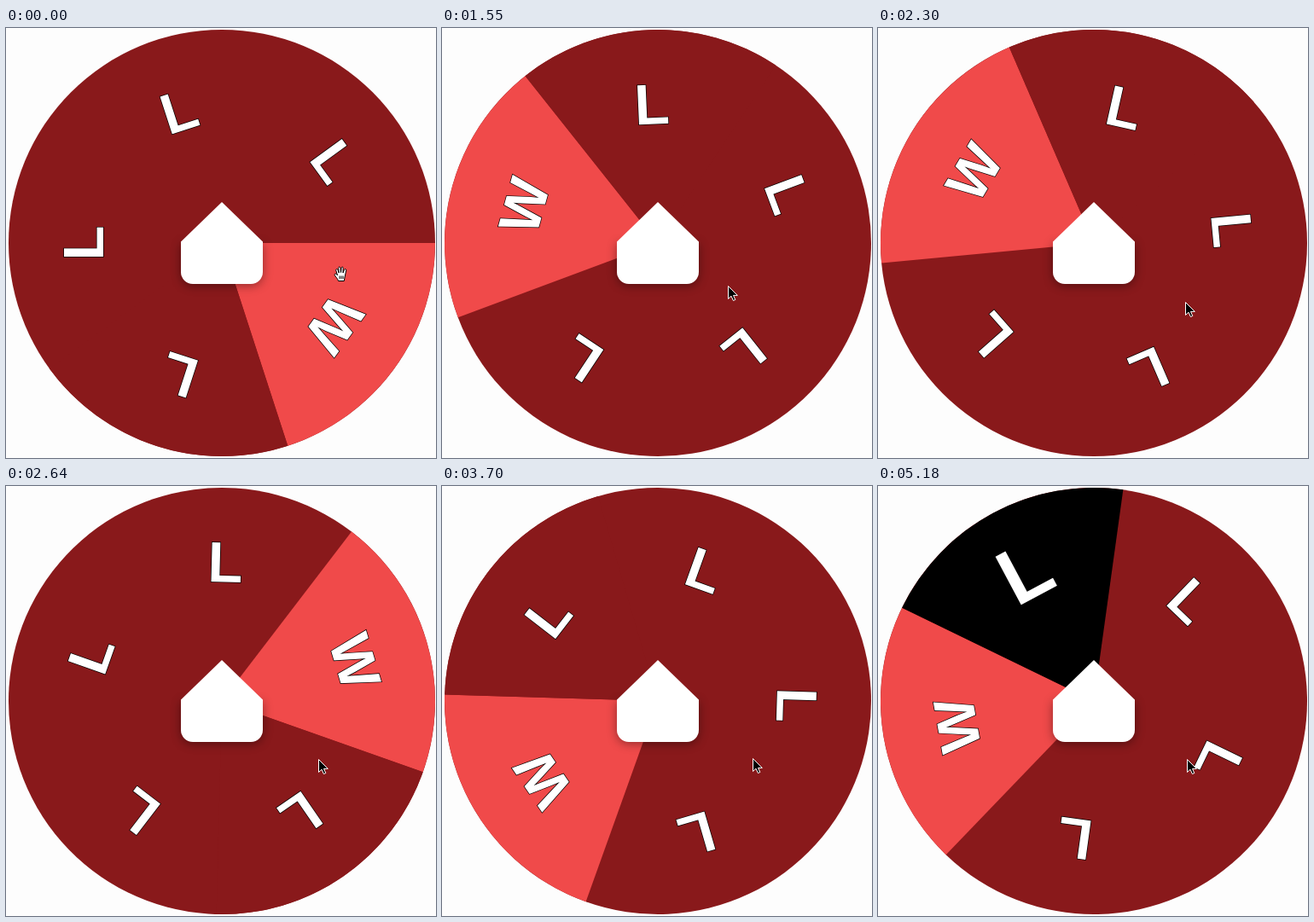
Animation, 504 px wide and 504 px high, one loop 5360 ms. Source, as an HTML page:

```html
<!DOCTYPE html>
<html lang="en">
<head>
<meta charset="utf-8">
<title>Prize wheel</title>
<style>
  html, body { margin: 0; width: 100%; height: 100%; overflow: hidden; background: #fdfdfd; }
  svg { display: block; width: 504px; height: 504px; }
  text {
    font: bold 67px "Liberation Sans", Arial, sans-serif;
    text-anchor: middle;
    fill: #fff;
    stroke: #000;
    stroke-width: 1.4px;
    paint-order: stroke;
  }
  #body { filter: drop-shadow(0 2px 6px rgba(0, 0, 0, .4)); }
  #hub { fill: #fff; }
  #arrow { fill: #000; stroke: #fff; stroke-width: 1; }
  #hand { fill: #fff; stroke: #000; stroke-width: 1; stroke-linejoin: round; }
</style>
</head>
<body>
<svg viewBox="0 0 504 504">
  <g transform="translate(253 252)">
    <g id="wheel"><circle r="250" fill="#89191b"/></g>
  </g>
  <g id="hub">
    <path id="body" d="M205 251H301V286a14 14 0 0 1-14 14H219a14 14 0 0 1-14-14Z"/>
    <path d="M253 204L301 250.5V252H205V250.5Z"/>
  </g>
  <g id="cursor">
    <path id="arrow" d="M.5 .5V15.5L4 12.2 6.4 17.5 8.8 16.5 6.5 11.4H11.3Z"/>
    <g id="hand" transform="translate(-7.5 -9)">
      <path d="M5 17.5C4.6 15 1.6 12.4 .7 10.6 .2 9 2 8.4 3.1 9.8L4 10.8 2.3 5.2C1.8 3.3 3.9 2.8 4.6 4.7L5.7 8 5.1 2.5C5 .7 7.1 .5 7.4 2.3L8 7.5 8.6 2.2C8.8 .5 10.8 .7 10.7 2.5L10.5 8 12 4.4C12.7 2.8 14.6 3.4 14.2 5.2L13 11C12.6 13.5 12 15 11.8 17.5Z"/>
      <path fill="none" d="M6.5 11.5V15M8.5 11.5V15M10.5 11.5V15"/>
    </g>
  </g>
</svg>
<script>
  const LOOP = 5360, RELEASE = 570, STOP = 4390, REVEAL = 250;
  const STEP = 72, RADIUS = 250, FINAL = 13 * 360 + 133.9;
  const DARK = [137, 25, 27];

  // The picture advances in even ticks of about 33 per second
  const TICK = 30.28;
  const snap = t => Math.floor((t + 5) / TICK) * TICK;
  const snapKeys = keys => keys.map(([t, ...rest]) => [snap(t), ...rest]);

  // [ms, degrees left to turn]; friction makes the decay exponential around REST
  const REST = 12.5;
  const spin = snapKeys([[580, FINAL], [1180, 1860.4], [1970, 540.8], [2640, 186.45],
    [3300, 57.8], [4120, 5.7], [STOP, 0]]);

  // [ms, x, y] of the mouse
  const mouse = snapKeys([[30, 392, 288], [270, 273, 109], [400, 340, 138], [580, 386, 236],
    [1180, 321, 287], [1970, 353, 321], [2640, 366, 320], [3300, 364, 319],
    [4120, 363, 320], [5150, 363, 320], [5180, 362, 320]]);

  const $ = id => document.getElementById(id);
  const wheel = $('wheel');
  const clamp = v => Math.min(1, Math.max(0, v));
  const mix = (a, b, p) => a + (b - a) * p;
  const smooth = p => p * p * (3 - 2 * p);

  function add(tag, attrs) {
    const el = document.createElementNS('http://www.w3.org/2000/svg', tag);
    for (const key in attrs) el.setAttribute(key, attrs[key]);
    return wheel.appendChild(el);
  }

  function addSector(index, fill) {
    const point = deg => {
      const a = deg * Math.PI / 180;
      return `${RADIUS * Math.cos(a)} ${RADIUS * Math.sin(a)}`;
    };
    const from = index * STEP;
    return add('path', {
      d: `M0 0L${point(from)}A${RADIUS} ${RADIUS} 0 0 1 ${point(from + STEP)}Z`, fill
    });
  }

  // Letters face outwards, standing on a common circle
  function placeLetter(el, index, scale) {
    const turn = (index + .5) * STEP + 90;
    el.setAttribute('transform', `rotate(${turn}) translate(0 -139.5) scale(${scale})`);
  }

  addSector(0, '#f04a4a');
  const picked = addSector(1, 'none');
  const letters = [...'WLLLL'].map((char, i) => {
    const el = add('text', {});
    el.textContent = char;
    placeLetter(el, i, 1);
    return el;
  });

  function segment(keys, t) {
    let i = 0;
    while (i < keys.length - 2 && t >= keys[i + 1][0]) i++;
    const [a, b] = [keys[i], keys[i + 1]];
    return [a, b, clamp((t - a[0]) / (b[0] - a[0]))];
  }

  function angleAt(t) {
    const [a, b, p] = segment(spin, t);
    const left = Math.exp(mix(Math.log(a[1] + REST), Math.log(b[1] + REST), p)) - REST;
    return FINAL - left;
  }

  function draw(t) {
    wheel.setAttribute('transform', `rotate(${angleAt(t) % 360})`);

    const reveal = smooth(clamp((t - STOP) / REVEAL));
    picked.setAttribute('fill', `rgb(${DARK.map(c => Math.round(c * (1 - reveal)))})`);
    placeLetter(letters[1], 1, mix(1, 1.39, reveal));

    const [a, b, p] = segment(mouse, t);
    const x = Math.round(mix(a[1], b[1], smooth(p)));
    const y = Math.round(mix(a[2], b[2], smooth(p)));
    $('cursor').setAttribute('transform', `translate(${x} ${y})`);
    $('hand').style.display = t < RELEASE ? '' : 'none';
    $('arrow').style.display = t < RELEASE ? 'none' : '';
  }

  const start = performance.now();
  function tick() {
    draw(snap((performance.now() - start) % LOOP));
    requestAnimationFrame(tick);
  }
  tick();
</script>
</body>
</html>
```
